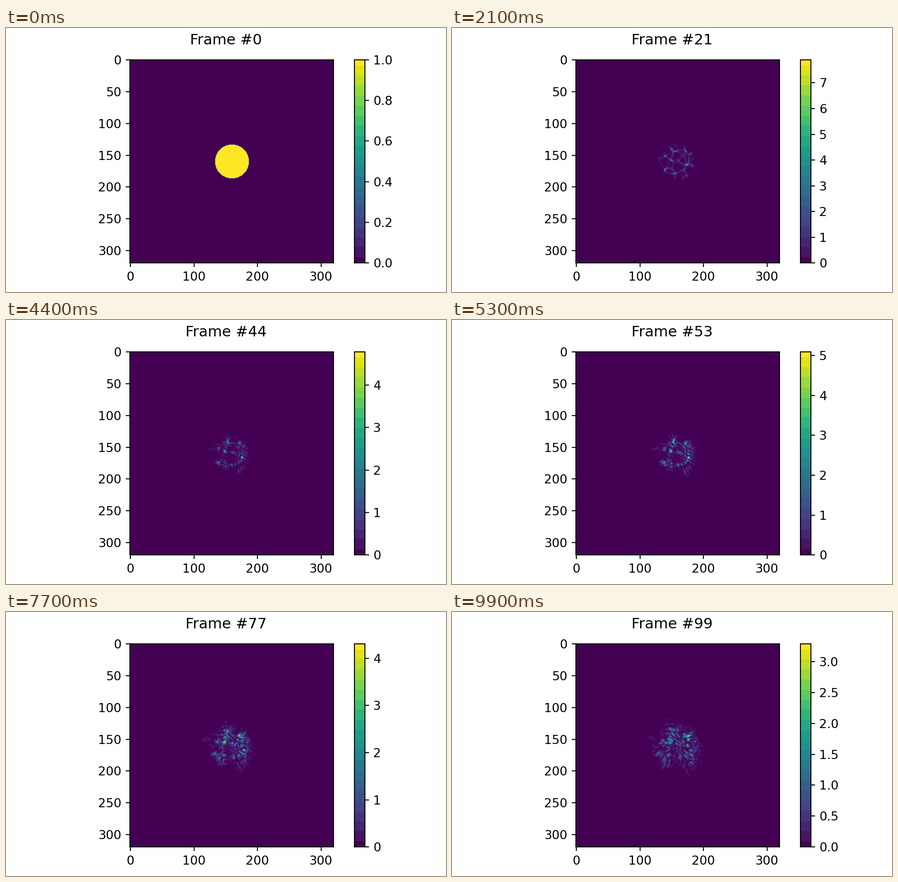
Recreate the animation shown at these times as a matplotlib script. Size 966 px wide and 580 px high, loop 10 s.

```python
import numpy as np
import matplotlib.pyplot as plt
from matplotlib.animation import FuncAnimation
from matplotlib.colors import ListedColormap

W, H, DPI = 966, 580, 193.2
FRAMES, INTERVAL = 100, 100
N, RADIUS = 320, 320 / 12
CORR, PHASE_RMS = 3.0, 2.5   # phase screen: grain in cells, strength in radians
STEP = 1.12                  # wavelength * distance per frame, in cells squared

# Peak intensity over time
PEAK_T = [0, 1, 4, 8, 12, 18, 22, 30, 33, 44, 53, 62, 77, 87, 99]
PEAK_V = [1, 2, 5, 9, 10.36, 8.2, 7.8, 6.3, 5.2, 4.79, 5.1, 5.39, 4.31, 3.8, 3.29]

y, x = np.mgrid[:N, :N] - N / 2
freq = np.fft.fftfreq(N)
f2 = freq[:, None] ** 2 + freq[None, :] ** 2


def phase_screen(seed):
    noise = np.random.default_rng(seed).standard_normal((N, N))
    blur = np.exp(-2 * (np.pi * CORR) ** 2 * f2)
    screen = np.fft.ifft2(np.fft.fft2(noise) * blur).real
    return PHASE_RMS * screen / screen.std()


disk = (np.hypot(x, y) < RADIUS).astype(float)
spectrum = np.fft.fft2(disk * np.exp(1j * phase_screen(7)))


def intensity(i):
    """Fresnel propagation of the scattered beam, scaled to its peak."""
    if i == 0:
        return disk, 1.0
    peak = np.interp(i, PEAK_T, PEAK_V)
    field = np.fft.ifft2(spectrum * np.exp(-1j * np.pi * STEP * i * f2))
    light = np.abs(field) ** 2
    return light * peak / light.max(), peak


def px_axes(left, width):
    return fig.add_axes([left / W, 0.11, width / W, 0.77])


# Viridis in 20 steps, with half steps at both ends
bands = np.round(np.linspace(0, 1, 256) * 20) / 20
cmap = ListedColormap(plt.get_cmap("viridis")(bands))

plt.rcParams["font.family"] = "DejaVu Sans"
fig = plt.figure(figsize=((W + 0.01) / DPI, (H + 0.01) / DPI), dpi=DPI)
ax = px_axes(272.4, 446.4)
cax = px_axes(765.2, 22.4)
image = ax.imshow(disk, cmap=cmap, vmin=0, vmax=1, aspect="auto")
ax.set_xticks(range(0, 301, 100))
ax.set_yticks(range(0, 301, 50))
fig.colorbar(image, cax=cax)
title = fig.suptitle("Frame #0")


def update(i):
    light, peak = intensity(i)
    image.set_data(light)
    image.set_clim(0, peak)
    title.set_text(f"Frame #{i}")
    return image, title


anim = FuncAnimation(fig, update, frames=FRAMES, interval=INTERVAL,
                     repeat=True, repeat_delay=0, blit=False)
plt.show()
```
